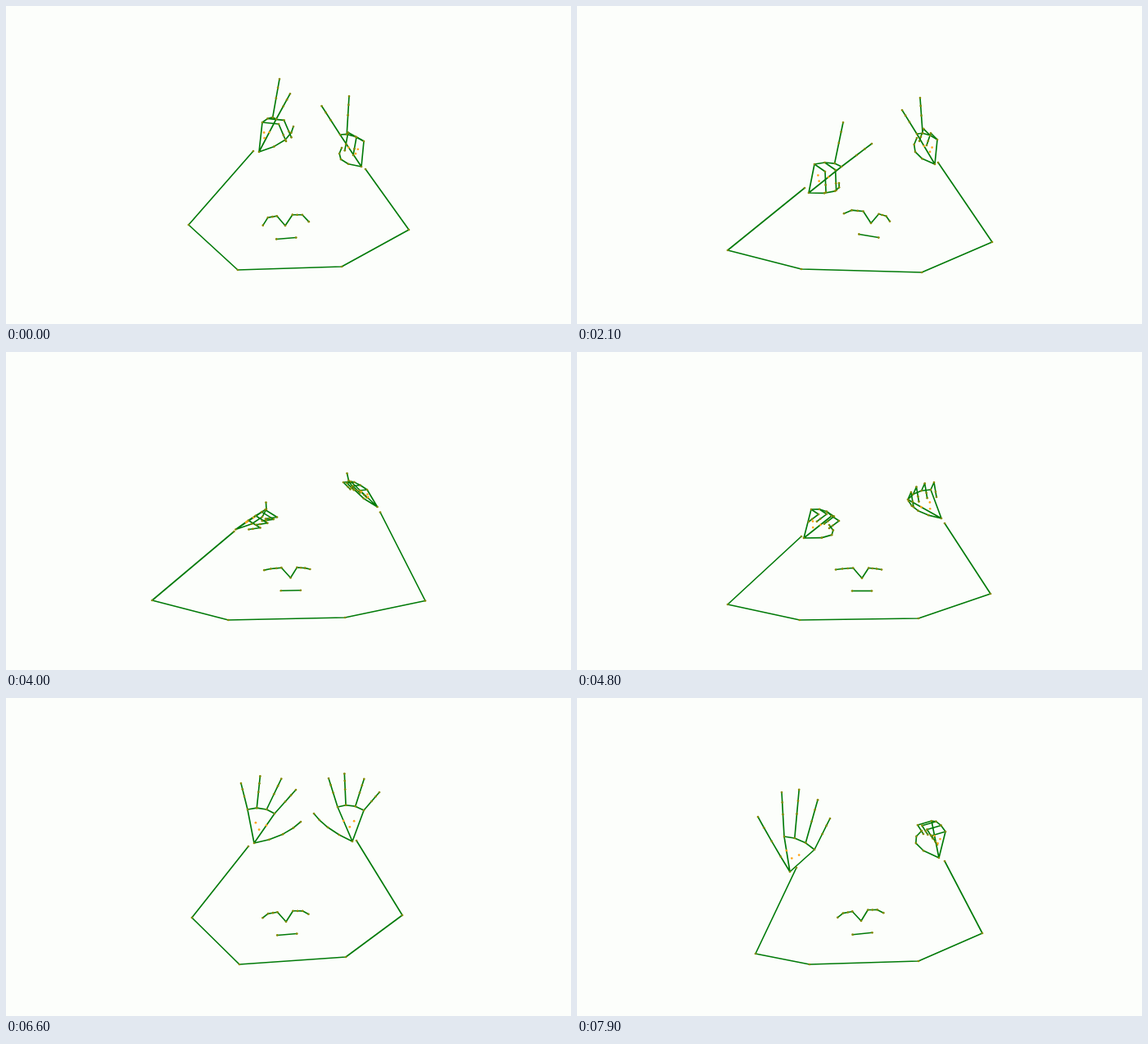
Recreate the animation shown at these times as an HTML page with a canvas. Size 690 by 388 pixels, loop 8 s.

```html
<!DOCTYPE html>
<html lang="en">
<head>
<meta charset="utf-8">
<title>Gesture skeleton</title>
<style>
  html, body { margin: 0; width: 100%; height: 100%; overflow: hidden; background: #fcfefb; }
  canvas { display: block; width: 690px; height: 388px; }
</style>
</head>
<body>
<canvas id="stage" width="690" height="388"></canvas>
<script>
const ctx = document.getElementById('stage').getContext('2d');
const LOOP = 8000, STEP = 100;
const poses = [];

const clamp = v => Math.min(1, Math.max(0, v));
const smooth = k => k * k * (3 - 2 * k);
const mix = (a, b, k) => a + (b - a) * k;
const mixPt = (p, q, k) => p.map((v, i) => mix(v, q[i], k));
const mixAll = (a, b, k) => a.map((p, i) => mixPt(p, b[i], k));
const add = (p, q) => [p[0] + q[0], p[1] + q[1]];
const pairs = list => Array.from({ length: list.length / 2 }, (_, i) => list.slice(2 * i, 2 * i + 2));

// n points from a to b, bulging away from a centre.
function arc(a, b, n, centre, bulge) {
  return Array.from({ length: n }, (_, i) => {
    const u = i / (n - 1);
    return mixPt(centre, mixPt(a, b, u), 1 + bulge * 4 * u * (1 - u));
  });
}

// palm: wrist, index knuckle, pinky knuckle, thumb bend, thumb tip
// tips: first and last straight finger; fold: where a folded finger turns and ends
function hand(straight, palm, tips, fold) {
  const [wrist, index, pinky, bend, thumb] = pairs(palm);
  const knuckles = arc(index, pinky, 4, wrist, 0.1);
  const ends = straight ? arc(...pairs(tips), straight, wrist, 0.18) : [];
  const fingers = knuckles.flatMap((k, i) => {
    if (i < straight) return [k, mixPt(k, ends[i], 0.5), mixPt(k, ends[i], 0.77), ends[i]];
    const [out, curl] = pairs(fold);
    return [k, add(k, out), add(k, mixPt(out, curl, 0.65)), add(k, curl)];
  });
  const thumbJoints = [0.27, 0.55, 0.8, 1].map(u =>
    mixPt(mixPt(wrist, bend, u), mixPt(bend, thumb, u), u));
  const loose = [mixPt(wrist, index, 0.6), mixPt(wrist, knuckles[2], 0.58), mixPt(wrist, knuckles[1], 0.4)];
  const joints = [wrist, ...thumbJoints, ...fingers, ...loose];
  return { wrist, joints: joints.map(p => [p[0] - wrist[0], p[1] - wrist[1]]) };
}
const peace = (palm, tips, fold) => hand(2, palm, tips, fold);
const open = (palm, tips) => hand(4, palm, tips);
const fist = (palm, fold) => hand(0, palm, null, fold);

// arms: wrist, elbow, shoulder, shoulder, elbow, wrist
// head: nose x and y, tilt, turn, height of the ears
// bob: elbow splay, left and right hand lift on the way to the next pose
function pose(time, arms, head, left, right, bob = [0, 0, 0]) {
  poses.push({ time, arms: pairs(arms), head, hands: [left, right], bob });
}

pose(0, [302, 177, 223, 267, 283, 322, 410, 318, 492, 273, 439, 199], [341, 268, -0.08, 1, -2.5],
  peace([309, 178, 330, 138, 313, 142, 348, 167, 351, 147], [347, 107, 334, 89], [20, 2, 29, 23]),
  peace([434, 196, 408, 157, 437, 165, 398, 192, 410, 173], [385.5, 122, 419, 110], [-9, -5, -13, 17]));

pose(1200, [281, 192, 198, 288, 276, 328, 418, 321, 509, 292, 457, 204], [342, 272, -0.06, -1, -7.5],
  peace([281, 205, 313, 168, 284, 171, 327, 200, 318, 184], [343, 135, 306, 116], [14, 4, 22, 28]),
  peace([450, 205, 426, 165, 456, 172, 412, 191, 430, 178], [404, 130, 431, 121], [-9, -5, -13, 14]),
  [3, 36, -10]);

pose(2100, [278, 222, 184, 298, 274, 321, 421, 325, 507, 288, 441, 191], [359, 265, 0.17, -6, -6],
  peace([283, 228, 323, 196, 290, 193, 325, 231, 320, 216], [360, 168, 325, 142], [13, 9, 14, 34]),
  peace([437, 193, 415, 156, 440, 163, 402, 182, 415, 161], [397, 127, 419, 112], [-8, -8, -13, 7]),
  [5, 0, 20]);

pose(3200, [283, 225, 187, 298, 271, 327, 411, 323, 505, 312, 465, 222], [347, 275, -0.04, -4, -9.5],
  fist([284, 218, 322, 197, 306, 231, 320, 194, 327, 168], [20, 12, 4, 7]),
  fist([462, 215, 438, 176, 450, 208, 424, 184, 428, 154], [-22, 11, -8, 10]),
  [7, 6, 20]);

pose(4800, [274, 225, 184, 308, 272, 327, 417, 325, 505, 295, 449, 209], [348, 276, 0, -4, -10.5],
  fist([277, 227, 311, 200, 286, 192, 327, 229, 308, 211], [9, 6, -3, 15]),
  fist([445, 203, 404, 180, 432, 168, 412, 197, 405, 182], [4, -9, 7, 9]));

pose(6600, [296, 181, 227, 268, 285, 325, 415, 316, 484, 265, 428, 174], [342, 273, -0.08, 0, -7],
  open([303, 177, 328, 141, 295, 136, 339, 171, 360, 151], [354, 112, 287, 104]),
  open([423, 175, 405, 133, 437, 137, 391, 161, 376, 141], [394, 98, 456, 115]),
  [6, 0, 0]);

pose(7900, [268, 207, 218, 312, 284, 325, 417, 321, 495, 287, 449, 199], [347, 272, -0.1, 0, -7],
  open([260, 212, 253, 169, 290, 185, 239, 178, 221, 145], [250, 115, 309, 147]),
  fist([442, 195, 433, 150, 450, 163, 398, 179, 421, 162], [-17, 5, -10, 16]));

function faceOf([x, y, tilt, turn, ear]) {
  const place = ([px, py]) => [x + px - tilt * py, y + py + tilt * px];
  const half = side => [[28, ear], [21, -11.5], [15, -12], [9.5, -12.5]]
    .map(([w, h]) => place([side * w + turn * w / 28, h]));
  return {
    brow: [...half(-1), [x, y], ...half(1).reverse()],
    mouth: [[-12, 15.5], [12, 15.5]].map(place)
  };
}

function line(points) {
  ctx.beginPath();
  points.forEach(p => ctx.lineTo(...p));
  ctx.stroke();
}

function dots(points, color) {
  ctx.fillStyle = color;
  for (const [x, y] of points) {
    ctx.beginPath();
    ctx.arc(x, y, 1.35, 0, Math.PI * 2);
    ctx.fill();
  }
}

function draw(t) {
  const next = Math.max(1, poses.findIndex(p => p.time >= t));
  const a = poses[next - 1], b = poses[next];
  const raw = (t - a.time) / (b.time - a.time);
  const k = smooth(raw);
  const change = smooth(clamp((raw - 0.4) / 0.2));
  const [splay, ...lift] = a.bob.map(v => v * Math.sin(Math.PI * raw) ** 2);

  const arms = mixAll(a.arms, b.arms, k);
  arms[0][1] -= lift[0];
  arms[5][1] -= lift[1];
  arms[1][0] -= splay;
  arms[4][0] += splay;

  const { brow, mouth } = faceOf(mixPt(a.head, b.head, k));
  const hands = a.hands.map((from, side) => {
    const to = b.hands[side];
    const wrist = add(mixPt(from.wrist, to.wrist, k), [0, -lift[side]]);
    return mixAll(from.joints, to.joints, change === 0 || raw === 1 ? Math.round(raw === 1) : change)
      .map(p => add(p, wrist));
  });

  ctx.fillStyle = '#fcfefb';
  ctx.fillRect(0, 0, 690, 388);
  ctx.strokeStyle = '#007a08';
  ctx.lineWidth = 1.65;
  ctx.lineJoin = 'round';
  [arms, brow, mouth].forEach(line);
  for (const h of hands) {
    for (let i = 1; i < 21; i += 4) line(h.slice(i, i + 4));
    line([h[1], h[0], h[5], h[9], h[13], h[17], h[0]]);
  }
  dots([...arms, ...brow, ...mouth, ...hands.flatMap(h => h.slice(0, 21))], '#858a00');
  dots(hands.flatMap(h => h.slice(21)), '#ffa51a');
}

const start = performance.now();
function tick() {
  const t = Math.max(0, performance.now() - start) % LOOP;
  draw(Math.floor(t / STEP) * STEP);
  requestAnimationFrame(tick);
}
tick();
</script>
</body>
</html>
```
